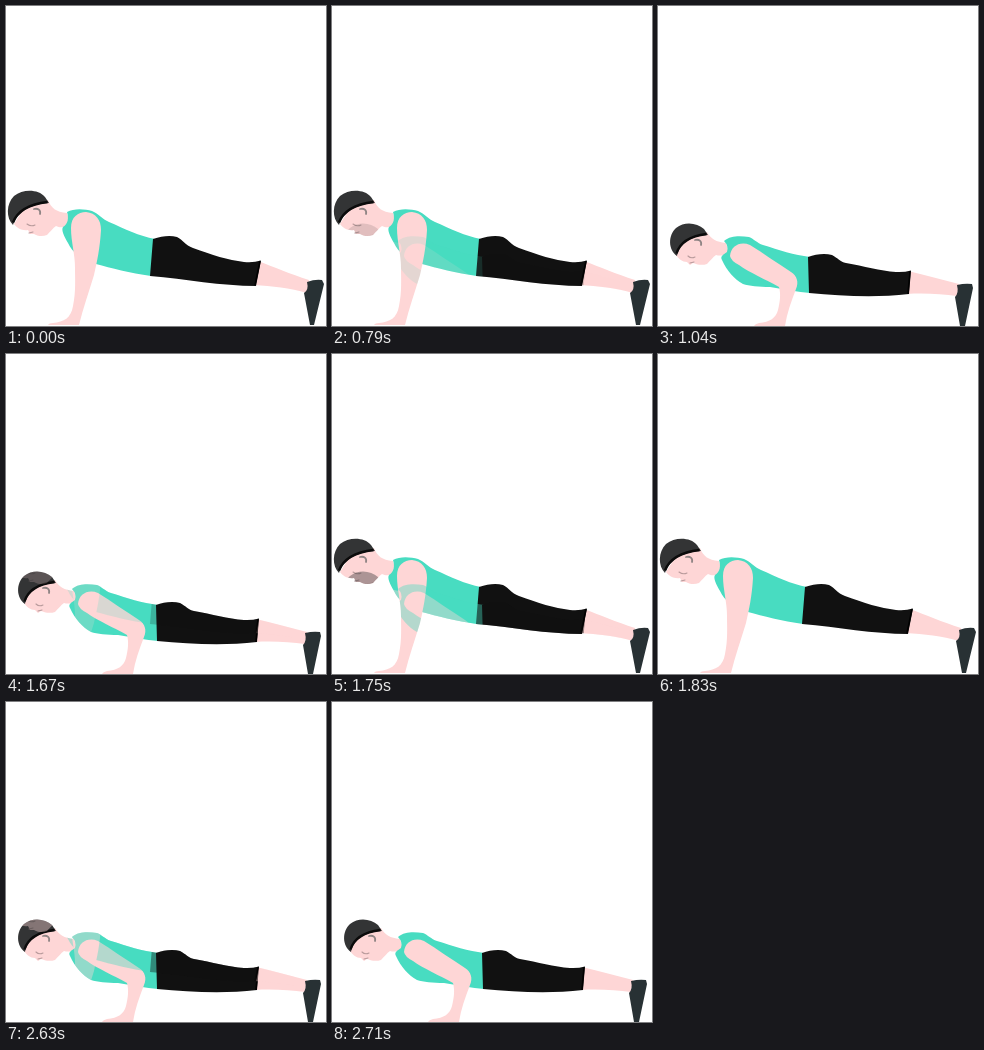
An HTML page without scripts that plays this animation: 320 px wide and 320 px high, repeating every 3.37 s.

```html
<!DOCTYPE html>
<html lang="en">
<head>
<meta charset="utf-8">
<title>Push-up</title>
<style>
  html, body { margin: 0; width: 100%; height: 100%; overflow: hidden; background: #fff; }
  svg { display: block; width: 100vw; height: 100vh; }
  .skin { fill: #fed6d6; }
  .cap { fill: #333435; }
  .top { fill: #48dcc1; }
  .shorts { fill: #111; }
  .shoe { fill: #283134; }
  .band { fill: none; stroke: #0b0b0b; stroke-width: 2.4; }
  .hair { fill: none; stroke: #8f8484; stroke-width: 1.8; stroke-linecap: round; }
  .eye { fill: none; stroke: #b99b9c; stroke-width: 1.1; stroke-linecap: round; }
  .cuff { fill: none; stroke: #000; stroke-width: 1.5; }
  mask { mask-type: alpha; }

  .low, .ghost-low, .ghost-high { animation: 3370ms step-end infinite; }
  .low { animation-name: swap; }
  .ghost-low { animation-name: sink; }
  .ghost-high { animation-name: rise; }

  /* which pose owns the outline */
  @keyframes swap {
    0% { opacity: 0 } 27% { opacity: 1 }
    51.92% { opacity: 0 } 78.03% { opacity: 1 } 100% { opacity: 1 }
  }
  /* low pose showing through the high one */
  @keyframes sink {
    0% { opacity: 0 } 23.44% { opacity: .143 } 24.62% { opacity: .286 } 25.81% { opacity: .429 }
    51.92% { opacity: .4 } 53.11% { opacity: .2 } 54.3% { opacity: 0 }
    75.37% { opacity: .2 } 76.55% { opacity: .4 } 100% { opacity: .4 }
  }
  /* high pose showing through the low one */
  @keyframes rise {
    0%, 27% { opacity: .429 } 28.48% { opacity: .286 } 29.67% { opacity: .143 } 30.86% { opacity: 0 }
    49.55% { opacity: .2 } 50.74% { opacity: .4 }
    79.22% { opacity: .2 } 80.41% { opacity: 0 } 100% { opacity: 0 }
  }
</style>
</head>
<body>
<svg viewBox="0 0 320 320" role="img" aria-label="A person doing push-ups">
  <defs>
    <g id="high-pose">
      <path class="skin" d="M8 218L18 202L42 194C45 202 50 206 61 207L64 218C59 222 54 222 50 220C47 222 44 226 41 229C36 231 31 230 28 228L24 228L22 224C16 225 11 222 8 218Z"/>
      <path class="cap" d="M7 219C0 212 0 198 8 190C17 183 32 183 39 191L43 197C27 198 12 204 7 219Z"/>
      <path class="band" d="M7 216.500C12 203.500 24 198 41.500 196"/>
      <path class="hair" d="M28 203C32 202 35 204 34 208"/>
      <path class="eye" d="M21 218Q25 221 29 219M23 227l4-1"/>
      <path class="skin" d="M252 255C268 261 284 268 303 274L301 287C284 282 266 280 248 279Z"/>
      <path class="shoe" d="M301 276Q309 273 316 274L318 278L308 319H304L298 287Q303 284 301 276Z"/>
      <path class="top" d="M61 206C68 202 79 203 86 205C93 208 96 213 103 216C119 223 133 230 149 233L145 270C124 267 105 262 90 258C75 254 66 246 62 237C58 230 55 224 57 221C62 218 63 212 61 206Z"/>
      <path class="shorts" d="M147 233C156 230 164 229 171 231C177 234 179 239 187 242C206 249 222 254 238 256Q247 257 255 254.500L250 280C215 280 180 273 144 270Z"/>
      <path class="cuff" d="M254 255L249 279"/>
      <path class="skin" d="M65 222C65 211 72 206 80 206C90 207 95 214 95 224C94 242 91 256 88 269C83 286 77 302 73 319H42Q43 317 47 317C58 316 65 312 67 300C70 286 69 273 69 262C69 248 65 236 65 222Z"/>
    </g>
    <g id="low-pose">
      <path class="skin" d="M18 249L26 235L49 226C53 233 58 236 68 237L71 247C66 250 61 250 58 249C55 251 52 255 49 258C43 260 38 258 35 257L32 259L29 256C24 256 21 253 18 249Z"/>
      <path class="cap" d="M19 250C10 244 10 229 18 222C27 215 39 217 46 223L50 229C34 230 22 236 19 250Z"/>
      <path class="band" d="M18.500 247.500C22 235.500 33 230 48.500 228"/>
      <path class="hair" d="M37 234C41 233 44 235 43 239"/>
      <path class="eye" d="M30 250Q33 253 37 251M32 257l4-1"/>
      <path class="skin" d="M250 265C268 269 284 274 301 278L299 290C284 288 266 287 249 288Z"/>
      <path class="shoe" d="M299 279Q307 277 314 278L315 282L307 320H302L297 291Q301 287 299 279Z"/>
      <path class="top" d="M66 235C73 229 83 230 91 231C96 233 99 237 105 239C121 244 136 249 152 251V287C140 286 126 283 112 281C101 281 91 280 85 278C76 273 69 265 64 254C62 250 65 249 69 246Q71 240 66 235Z"/>
      <path class="shorts" d="M150 251C158 248 167 247 174 249C180 252 182 256 188 257C206 260 222 265 238 266Q246 266.500 253 264.500L251 288C217 292 184 290 151 287Z"/>
      <path class="cuff" d="M252 265L250 288"/>
      <path class="skin" d="M72 250C73 240 82 235 92 239C105 247 119 257 133 266C139 270 141 276 138 283C133 296 129 307 127 320H96Q97 318 101 317C112 316 118 312 120 304C122 296 123 288 121 281C107 273 92 267 81 259Q73 255 72 250Z"/>
    </g>
    <mask id="in-high" maskUnits="userSpaceOnUse" width="320" height="320"><use href="#high-pose"/></mask>
    <mask id="in-low" maskUnits="userSpaceOnUse" width="320" height="320"><use href="#low-pose"/></mask>
  </defs>

  <!-- each pose shows the other only inside its own outline -->
  <g>
    <use href="#high-pose"/>
    <g mask="url(#in-high)"><use class="ghost-low" href="#low-pose"/></g>
  </g>
  <g class="low">
    <rect width="320" height="320" fill="#fff"/>
    <use href="#low-pose"/>
    <g mask="url(#in-low)"><use class="ghost-high" href="#high-pose"/></g>
  </g>
</svg>
</body>
</html>
```
